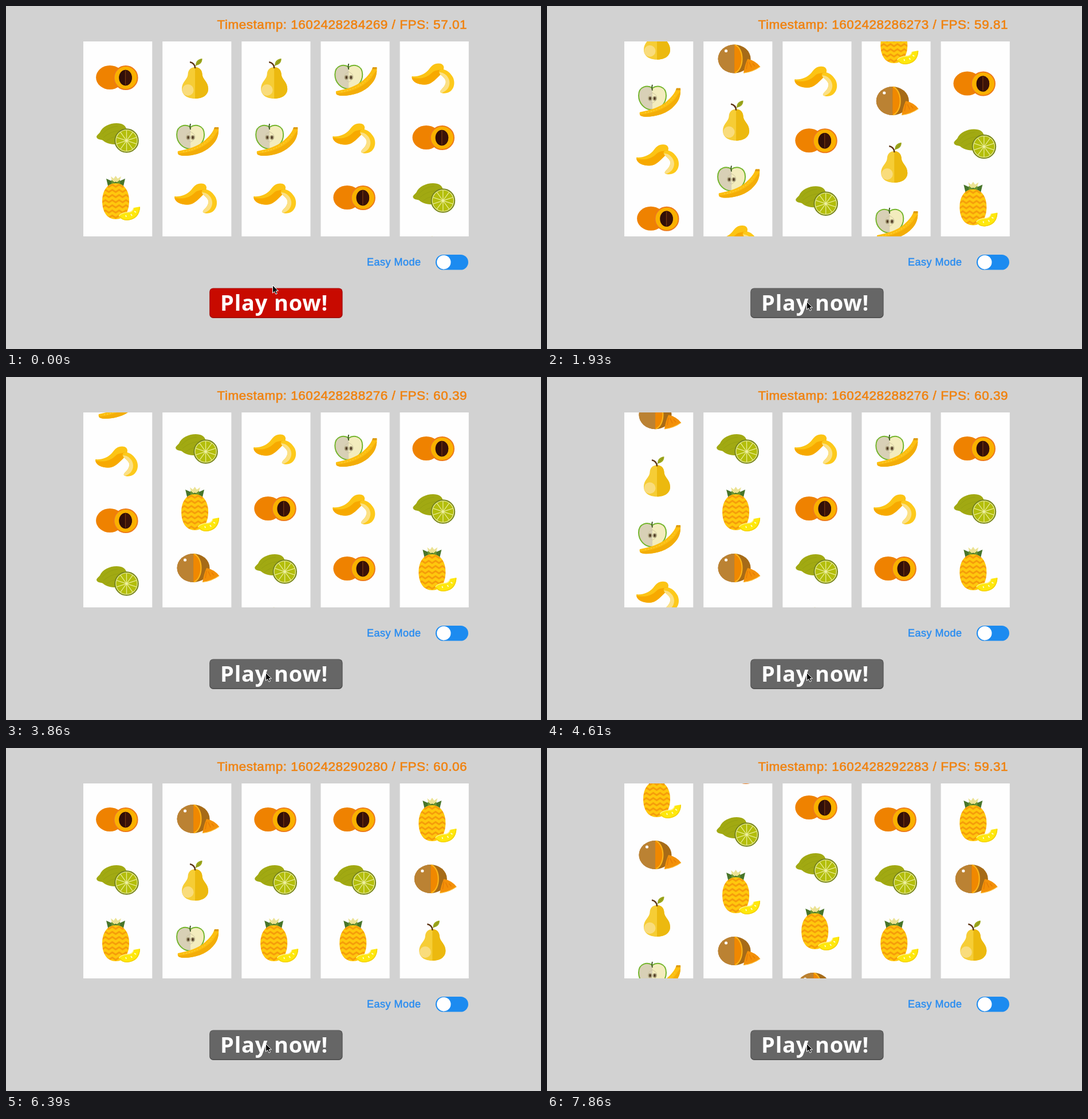
Recreate the animation shown at these times as an HTML page. Size 934 px wide and 600 px high, loop 8000 ms.

```html
<!DOCTYPE html>
<html lang="en">
<head>
<meta charset="utf-8">
<title>Fruit slots</title>
<style>
html, body { margin: 0; width: 100%; height: 100%; overflow: hidden; background: #d2d2d2; }
svg { display: block; width: 934px; height: 600px; }
text { font-family: "Liberation Sans", Arial, sans-serif; white-space: pre; }
#stats { font-size: 22.5px; letter-spacing: .53px; fill: #f0820f; stroke: #f0820f; stroke-width: .6px; }
#mode { font-size: 18px; letter-spacing: .5px; fill: #2b8df0; stroke: #2b8df0; stroke-width: .5px; }
#label { font: 700 38px "Open Sans", "Noto Sans", sans-serif; letter-spacing: .8px; fill: #fff; }
#button { --face: #c80a00; --edge: #a00f0a; }
#button.busy { --face: #666; --edge: #505050; }
.edge { fill: var(--edge); }
.face { fill: var(--face); }
</style>
</head>
<body>
<svg viewBox="0 0 934 600">
  <defs>
    <clipPath id="window"><rect y="62" width="120.5" height="341"/></clipPath>
    <pattern id="zigzag" x="2.5" y="-25" width="12" height="9" patternUnits="userSpaceOnUse">
      <rect width="12" height="9" fill="#ffc80d"/>
      <path d="M-2 3.7L0 2.5L6 6.5L12 2.5L14 3.7" fill="none" stroke="#f59d0a" stroke-width="2.8"/>
    </pattern>

    <!-- Each fruit is placed relative to the left edge of its reel and the middle of its row. -->
    <g id="fruit0">
      <ellipse cx="46.3" cy="0" rx="24.2" ry="21" fill="#ef8200"/>
      <circle cx="74" cy=".5" r="20.6" fill="#fab100" stroke="#ed7a1a" stroke-width="2"/>
      <ellipse cx="73.5" cy=".5" rx="11.3" ry="13.8" fill="#300e08"/>
      <path d="M73.5 -13.3a11.3 13.8 0 0 1 0 27.6z" fill="#3b1308"/>
      <path d="M73.5 -12v25" stroke="#74360e" stroke-width="1.3"/>
    </g>
    <g id="fruit1">
      <path d="M23 -1C23 -4 27 -6 29 -9C33 -19 46 -25 58 -25C68 -25 74 -21 75 -15L69 11C58 13 42 13 34 5C30 3 24 4 23 -1Z" fill="#a1a912"/>
      <path d="M33 -6Q43 -18 60 -20M35 0Q46 -10 62 -12M40 6Q48 0 57 -2" fill="none" stroke="#98a111" stroke-width="1"/>
      <circle cx="75.5" cy="5.5" r="20.3" fill="#e6e98f" stroke="#76841a" stroke-width="2"/>
      <circle cx="75.5" cy="5.5" r="18" fill="#b3be0b"/>
      <path transform="translate(75.5 5.5) rotate(18)" d="M-18 0H18M-14.6 -10.6L14.6 10.6M-5.6 -17.1L5.6 17.1M5.6 -17.1L-5.6 17.1M14.6 -10.6L-14.6 10.6" stroke="#e9eb93" stroke-width="1.3"/>
      <circle cx="75.5" cy="5.5" r="2" fill="#eef0a3"/>
    </g>
    <g id="fruit2">
      <path d="M48 -37L53 -33L56.5 -38L60 -33L66 -37L62 -25H51Z" fill="#ebe293"/>
      <path d="M40 -33L49 -29L56.5 -26L64 -29L73 -33L69 -16H44Z" fill="#47752a"/>
      <path d="M49 -31L56.5 -25L64 -31L64.5 -16H48.5Z" fill="#6a9531"/>
      <path d="M53 -25L56.5 -28L60 -25L59 -16H54Z" fill="#4b792b"/>
      <path d="M56.5 -25C71 -25 80 -12 80 6C80 26 71 38 56.5 38C42 38 33 26 33 6C33 -12 42 -25 56.5 -25Z" fill="url(#zigzag)"/>
      <path d="M62 32C65 38 70 40 77 40C91 39 99 30 99 16L88 18C87 23 83 26 77 26C72 26 66 28 62 32Z" fill="#fee80c"/>
      <path d="M88 18C87 23 83 26 77 26C72 26 66 28 62 32" fill="none" stroke="#fff07a" stroke-width="1.3"/>
      <path d="M64 33Q68 40 77 39.4Q97 37 98.4 17" fill="none" stroke="#f3cc08" stroke-width="1.3"/>
      <path d="M74 31l1 3M83 29l2 3M89 24l3 2" stroke="#fffbd0" stroke-width="1.8"/>
    </g>
    <g id="fruit3">
      <ellipse cx="54" cy="-1" rx="28.5" ry="25" fill="#a66b17"/>
      <path d="M54 -26A28.5 25 0 0 0 54 24Z" fill="#bb8233"/>
      <path d="M54 -26C71 -20 71 18 54 24Z" fill="#f08800"/>
      <path d="M55 -25.5C71.5 -19 71.5 17 55 23.5" fill="none" stroke="#fbb418" stroke-width="2.2"/>
      <circle cx="39.5" cy="-15" r="2.6" fill="#fff"/>
      <path d="M77 -1Q91 2 99 12.5Q85 22 70 23.5Q72 10 77 -1Z" fill="#f39008"/>
      <path d="M70 23.5Q86 22 99 12.5" fill="none" stroke="#fbb62a" stroke-width="1.4"/>
      <path d="M77 4L75 17M80 5L84 14M86 7L90 12" stroke="#e57b05" stroke-width="1.4"/>
    </g>
    <g id="fruit4">
      <path d="M57 -18C49 -18 45 -13 44.5 -6C44 4 34 7 34 20C34 31 44 37 57 37C70 37 80 31 80 20C80 7 70 4 69.5 -6C69 -13 65 -18 57 -18Z" fill="#f6cd35"/>
      <path d="M57 -18C65 -18 69 -13 69.5 -6C70 4 80 7 80 20C80 31 70 37 57 37Z" fill="#ecb90f"/>
      <circle cx="44.5" cy="22" r="10" fill="#f9dc7c"/>
      <path d="M57 -16C57 -22 54 -25.5 48 -27" fill="none" stroke="#5d3414" stroke-width="2.5"/>
      <path d="M58 -21C58 -29 63 -32.5 69.5 -33C69.5 -26 66 -22 58 -21Z" fill="#9da71b"/>
      <path d="M57 -19L68 -31.5" stroke="#7c881a" stroke-width=".9"/>
    </g>
    <g id="fruit5">
      <path id="apple" d="M49 -18C41 -24 25 -22 25 -5C25 8 35 20 49 20C63 20 73 8 73 -5C73 -22 57 -24 49 -18Z" fill="#f3ecbd"/>
      <path d="M49 -18C41 -24 25 -22 25 -5C25 8 35 20 49 20Z" fill="#d8d0b6"/>
      <path d="M49 -18C41 -24 25 -22 25 -5C25 8 35 20 49 20C63 20 73 8 73 -5C73 -22 57 -24 49 -18Z" fill="none" stroke="#74b52d" stroke-width="2"/>
      <path d="M49 -24Q47.5 -20 49 -14" fill="none" stroke="#3f5a25" stroke-width="2"/>
      <path d="M49 -10C43 -7 40 -4 42 2C44 5 46 6 49 8C52 6 54 5 56 2C58 -4 55 -7 49 -10Z" fill="none" stroke="#d0c8a0" stroke-width="1"/>
      <g fill="#a39a77"><ellipse cx="45" cy="0" rx="3.4" ry="4"/><ellipse cx="53" cy="0" rx="3.4" ry="4"/></g>
      <g fill="#4a321c"><ellipse cx="45" cy="0" rx="1.5" ry="2.4"/><ellipse cx="53" cy="0" rx="1.5" ry="2.4"/></g>
      <path d="M27 24C45 20 62 16 74 5C82 -2 88 -9 91 -18H98C99 -8 96 4 88 12C76 26 56 32 38 32C30 32 25 29 27 24Z" fill="#fcbf10"/>
      <path d="M27 28C50 27 82 16 94 -8L98 -12C98 -4 95 5 88 12C76 26 56 32 38 32C31 32 27 30 27 28Z" fill="#f3ad08"/>
      <path d="M36 25Q72 19 89 -6" fill="none" stroke="#fbd65e" stroke-width="1" stroke-dasharray="2 3"/>
      <path d="M91 -18H98L98.1 -14.5H90Z" fill="#dd9b12"/>
    </g>
    <g id="fruit6">
      <path d="M21 -2C32 -1 43 -5 50 -13C56 -21 60 -24.5 67 -24.5C73 -25 77 -22 77 -17C76 -9 70 -4 66 0C58 8 53 12 44 12.5C34 13 21 8 21 -2Z" fill="#fcc414"/>
      <path d="M21 0C36 4 48 0 56 -8C62 -14 68 -12 76.5 -15C75 -8 70 -4 66 0C58 8 53 12 44 12.5C34 13 22 9 21 0Z" fill="#f7a900"/>
      <path d="M70 -13C79 -17 88 -9 93 0C97 9 95 19 88 24.5C82 28.5 72 29 70.5 25C71 21 78 18 80 10C82 4 76 -1 71 -5C68 -8 68 -11 70 -13Z" fill="#fdc91b"/>
      <path d="M69 -9C79 -9 87 0 87 9C87 18 81 25 72 27L70.5 25C71 21 78 18 80 10C82 4 76 -1 71 -5Z" fill="#fbe085"/>
    </g>
  </defs>

  <rect width="934" height="600" fill="#d2d2d2"/>
  <text id="stats" x="368.5" y="40"></text>
  <g id="reels"></g>

  <text id="mode" x="630" y="454">Easy Mode</text>
  <rect x="750" y="435" width="57" height="26.5" rx="13.2" fill="#1c8bf0"/>
  <circle cx="764.3" cy="448.2" r="12.2" fill="#fff"/>

  <g id="button">
    <rect class="edge" x="355.2" y="493.4" width="232.4" height="52.6" rx="6.5"/>
    <rect class="face" x="356.2" y="494.2" width="230.2" height="50" rx="5.5"/>
    <text id="label" x="374" y="533">Play now!</text>
  </g>
  <path id="cursor" d="M.5 .5V14.2L3.7 11.3L6 16.2L8.4 15.1L6.2 10.3H10.4Z" fill="#000" stroke="#fff"/>
</svg>
<script>
const LOOP = 8000, ROW = 105, FRUITS = 7;
const STEPS = 20;                  // reel steps per symbol
const TURN = 2 * FRUITS * STEPS;   // every spin is two full turns
const SPEEDS = [1, 2, 3, 4, 6];    // steps per update
const START = [0, 4, 4, 5, 6];

// Updates made by a tick: a count at a known tick plus a steady rate.
const SPINS = [
  { from: 6, tick: 11, count: 47.2, rate: 8.97, result: [0, 1, 6, 5, 0] },
  { from: 41, tick: 45, count: 37, rate: 9.16, result: [0, 3, 0, 0, 2] }
];

// [tick, last digits of the timestamp, frames per second]
const STATS = [
  [-1, 84269, "57.01"], [4, 85272, "59.61"], [11, 86273, "59.81"],
  [17, 87273, "60.10"], [24, 88276, "60.39"], [31, 89276, "59.74"],
  [38, 90280, "60.06"], [44, 91280, "58.82"], [51, 92283, "59.31"]
];
const CURSOR = [[-1, 465, 488], [0, 453, 501], [1, 441, 514], [4, 453, 517]];

const $ = id => document.getElementById(id);
const latest = (list, tick) => list.filter(row => row[0] <= tick).pop();

function add(parent, name, attrs) {
  const el = document.createElementNS("http://www.w3.org/2000/svg", name);
  for (const key in attrs) el.setAttribute(key, attrs[key]);
  return parent.appendChild(el);
}

const strips = START.map((_, col) => {
  const reel = add($("reels"), "g", {
    transform: `translate(${135 + 138.1 * col} 0)`, "clip-path": "url(#window)"
  });
  add(reel, "rect", { y: 62, width: 120.5, height: 341, fill: "#fefefe" });
  const strip = add(reel, "g", {});
  for (let i = -1; i <= 10; i++)
    add(strip, "use", { href: "#fruit" + (i + FRUITS) % FRUITS, y: i * ROW });
  return strip;
});

// Fast reels may pass the mark for one update before they snap back to it.
function travel(updates, speed) {
  const moved = updates * speed;
  return moved >= TURN + speed ? TURN : moved;
}

function draw(tick) {
  const spin = SPINS.filter(s => s.from <= tick).pop();
  const updates = spin ? Math.max(0, Math.round(spin.count + spin.rate * (tick - spin.tick))) : 0;
  strips.forEach((strip, col) => {
    const top = spin ? spin.result[col] - travel(updates, SPEEDS[col]) / STEPS : START[col];
    const wrapped = (top + 3 * FRUITS) % FRUITS;
    strip.setAttribute("transform", `translate(0 ${125 - wrapped * ROW})`);
  });
  $("button").classList.toggle("busy", !!spin && updates < TURN);

  const [, stamp, fps] = latest(STATS, tick);
  $("stats").textContent = `Timestamp: 16024282${stamp} / FPS: ${fps}`;
  const [, x, y] = latest(CURSOR, tick);
  $("cursor").setAttribute("transform", `translate(${x} ${y})`);
}

const began = performance.now();
let shown;
function frame() {
  const time = (performance.now() - began) % LOOP;
  const tick = Math.max(-1, Math.floor((time - 280) / 148.43));
  if (tick !== shown) draw(shown = tick);
  requestAnimationFrame(frame);
}
frame();
</script>
</body>
</html>
```
